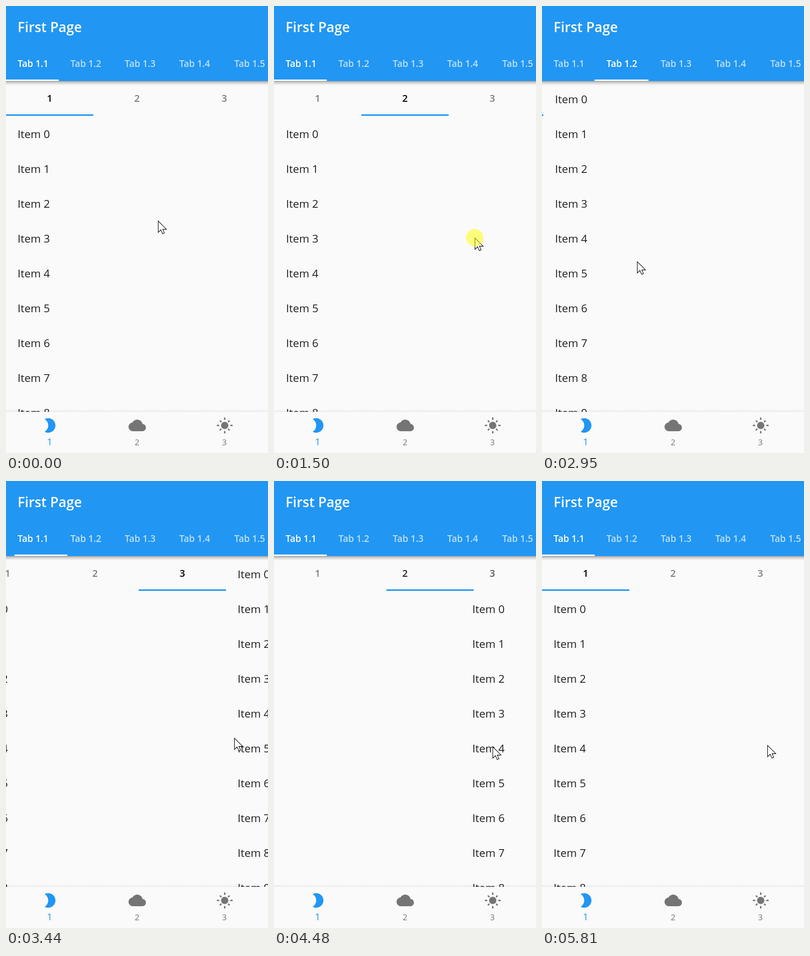
An HTML page for the animation above (6090 ms loop, 543 px wide and 924 px high).

```html
<!DOCTYPE html>
<html lang="en">
<head>
<meta charset="utf-8">
<title>Nested tabs</title>
<style>
  html, body { margin: 0; width: 100%; height: 100%; overflow: hidden; background: #fafafa; }
  svg { display: block; width: 543px; height: 924px; }
  text { font-family: "Open Sans", sans-serif; white-space: pre; }
  .title { font-size: 28.3px; font-weight: 600; fill: #fff; }
  .tab { font-size: 19.2px; font-weight: 600; letter-spacing: -.1px; fill: #fff; }
  .sub { font-size: 20px; font-weight: 600; text-anchor: middle; }
  .item { font-size: 22.7px; fill: #1f1f1f; }
  .nav { font-size: 17px; fill: #757575; text-anchor: middle; }
  .nav.on { font-size: 20px; fill: #2196f3; }
</style>
</head>
<body>
<svg id="stage" viewBox="0 0 543 924">
  <defs>
    <linearGradient id="drop" x2="0" y2="1">
      <stop offset="0" stop-opacity=".36"/>
      <stop offset=".4" stop-opacity=".16"/>
      <stop offset="1" stop-opacity="0"/>
    </linearGradient>
    <linearGradient id="lift" x2="0" y2="1">
      <stop offset="0" stop-opacity="0"/>
      <stop offset="1" stop-opacity=".07"/>
    </linearGradient>
  </defs>
  <rect width="543" height="924" fill="#fafafa"/>
  <g id="body"></g>
  <rect y="155" width="543" height="9" fill="url(#drop)"/>
  <rect width="543" height="155" fill="#2196f3"/>
  <text class="title" x="24" y="54">First Page</text>
  <g id="tabs"></g>
  <rect id="bar" y="152" height="3" fill="#fff"/>
  <rect y="834" width="543" height="5" fill="url(#lift)"/>
  <rect y="839" width="543" height="85" fill="#fafafa"/>
  <g fill="#757575">
    <path fill="#2196f3" transform="translate(72.5 849) scale(1.5)" d="M10 2c-1.82 0-3.53.5-5 1.35C7.99 5.08 10 8.3 10 12s-2.01 6.92-5 8.65C6.47 21.5 8.18 22 10 22c5.52 0 10-4.48 10-10S15.52 2 10 2z"/>
    <path transform="translate(254 849) scale(1.5)" d="M19.35 10.04C18.67 6.59 15.64 4 12 4 9.11 4 6.6 5.64 5.35 8.04 2.34 8.36 0 10.91 0 14c0 3.31 2.69 6 6 6h13c2.76 0 5-2.24 5-5 0-2.64-2.05-4.78-4.65-4.96z"/>
    <g id="sun" transform="translate(453.3 867)"><circle r="7.6"/></g>
  </g>
  <text class="nav on" x="90.5" y="908">1</text>
  <text class="nav" x="271.5" y="908">2</text>
  <text class="nav" x="452.5" y="908">3</text>
  <g id="mouse">
    <path d="M.5 .5V24L5.9 18.8 9.6 26.7 13.2 25.2 9.8 17.6H17.6Z" fill="#fff" stroke="#000" stroke-width="1.1"/>
    <circle id="press" r="18" fill="#ff0" fill-opacity=".5"/>
  </g>
</svg>
<script>
const LOOP = 6090, W = 543, STEP = 69.4, FIRST = 450;
const $ = id => document.getElementById(id);

function add(parent, tag, attrs, text) {
  const el = document.createElementNS('http://www.w3.org/2000/svg', tag);
  for (const k in attrs) el.setAttribute(k, attrs[k]);
  if (text) el.textContent = text;
  parent.appendChild(el);
  return el;
}

function addList(top) {
  const g = add($('body'), 'g', {});
  for (let i = 0; top + 72 * i < 850; i++)
    add(g, 'text', { class: 'item', x: 24, y: top + 72 * i }, 'Item ' + i);
  return g;
}

const lists = [273, 273, 273].map(addList);
const nextPage = addList(201);
const subBar = add($('body'), 'g', {});
const subs = [0, 1, 2].map(i => add(subBar, 'text', { class: 'sub', x: 90.5 + 181 * i, y: 198 }, i + 1));
const subLine = add(subBar, 'rect', { y: 224, width: 181, height: 3, fill: '#2196f3' });
const tabs = [24, 133.5, 246, 359, 473].map((x, i) =>
  add($('tabs'), 'text', { class: 'tab', x, y: 126 }, 'Tab 1.' + (i + 1)));

for (let i = 0; i < 8; i++) {
  const [a, b] = i % 2 ? [11, 13] : [12.7, 15.2];
  add($('sun'), 'line', { x1: a, x2: b, transform: `rotate(${45 * i})`,
    stroke: '#757575', 'stroke-width': 3, 'stroke-linecap': 'round' });
}

// Swipes: start ms, drag speed px/s, drag seconds, view, direction
const swipes = [
  [1002, 3000, .13, 'inner', 1],
  [1577, 1450, .145, 'inner', 1],
  [2268, 1450, .145, 'outer', 1],
  [3180, 2050, .15, 'outer', -1],
  [4249, 1700, .15, 'inner', -1],
  [5060, 2300, .14, 'inner', -1]
];

// Pointer path: ms, x, y
const path = [
  [460, 315, 444], [930, 459, 462], [965, 459, 463], [1002, 432, 464], [1132, 60, 468],
  [1300, 250, 474], [1480, 416, 479], [1510, 416, 479], [1577, 390, 482], [1722, 180, 490],
  [2200, 413, 505], [2230, 413, 506], [2268, 388, 506], [2332, 295, 506], [2413, 178, 515],
  [2700, 180, 526], [2950, 196, 528], [3080, 208, 528], [3165, 208, 528], [3180, 235, 528],
  [3330, 525, 530], [3600, 400, 532], [3928, 278, 532], [4180, 230, 540], [4249, 257, 542],
  [4399, 505, 548], [4700, 320, 551], [4969, 229, 551], [5020, 215, 550], [5060, 242, 549],
  [5200, 525, 547], [5500, 480, 546], [5640, 467, 546]
];
const presses = [[940, 1132], [1480, 1722], [2215, 2413], [3060, 3330], [4180, 4399], [5010, 5200]];

// Finger drag, then an overdamped spring to the page edge
function travel(s, speed, drag) {
  if (s <= 0) return 0;
  if (s < drag) return speed * s;
  const p = 9.076, q = 22.04, left = W - speed * drag;
  const a = (q * left - speed) / (q - p);
  const rest = a * Math.exp(-p * (s - drag)) + (left - a) * Math.exp(-q * (s - drag));
  return rest < .9 ? W : W - rest;
}

function scroll(t) {
  const pos = { inner: 0, outer: 0 };
  swipes.forEach(([start, speed, drag, view, dir], i) => {
    const next = swipes[i + 1];
    const done = next && t >= next[0];
    pos[view] += dir * (done ? W : travel((t - start) / 1000, speed, drag));
  });
  return pos;
}

function pointer(t) {
  const i = path.findIndex(p => p[0] > t);
  if (i < 0) return path[path.length - 1].slice(1);
  if (!i) return path[0].slice(1);
  const a = path[i - 1], b = path[i], k = (t - a[0]) / (b[0] - a[0]);
  return [1, 2].map(j => a[j] + (b[j] - a[j]) * k);
}

const near = (i, page) => Math.max(0, 1 - Math.abs(i - page));
const move = (el, x, y = 0) => el.setAttribute('transform', `translate(${Math.round(x)} ${Math.round(y)})`);

function draw(time) {
  const n = Math.floor((time - FIRST) / STEP);
  const t = n < 0 ? 0 : FIRST + 8 + n * STEP;
  const { inner, outer } = scroll(t);
  const page = inner / W, tab = outer / W;

  lists.forEach((g, i) => move(g, i * W - inner - outer));
  move(nextPage, W - outer);
  move(subBar, -outer);
  subLine.setAttribute('x', Math.round(page * 181));
  subs.forEach((el, i) => el.setAttribute('fill-opacity', .5 + .5 * near(i, page)));
  tabs.forEach((el, i) => el.setAttribute('fill-opacity', .7 + .3 * near(i, tab)));
  $('bar').setAttribute('x', tab * 109.4);
  $('bar').setAttribute('width', 109.4 + tab * 2.6);

  move($('mouse'), ...pointer(t));
  const down = presses.some(([a, b]) => t >= a && t < b);
  $('press').setAttribute('visibility', down ? 'visible' : 'hidden');
}

function tick(now) {
  draw(now % LOOP);
  requestAnimationFrame(tick);
}
draw(0);
requestAnimationFrame(tick);
</script>
</body>
</html>
```
